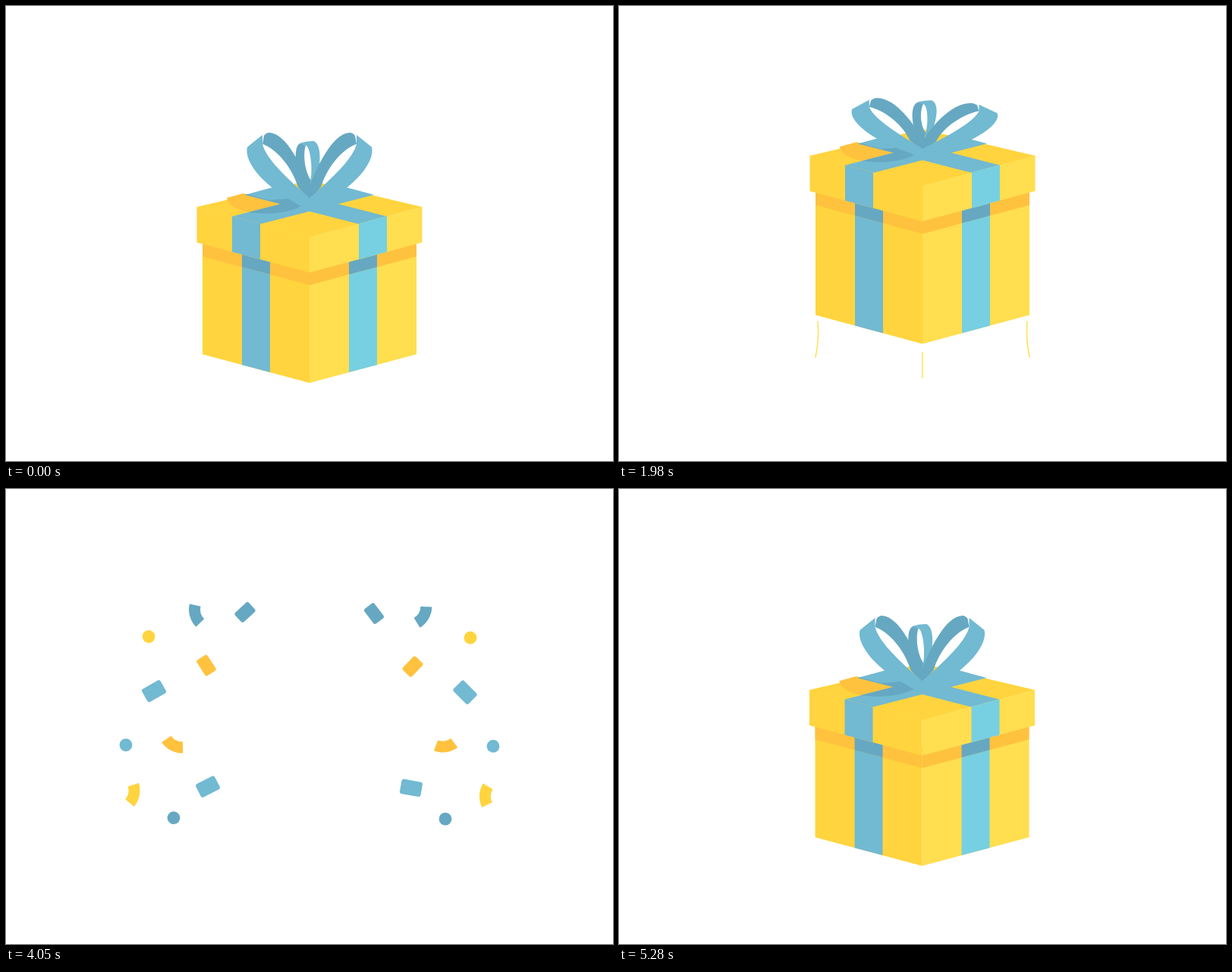
An HTML page with a canvas for the animation above (5310 ms loop, 800 by 600 pixels).

```html
<!DOCTYPE html>
<html lang="en">
<head>
<meta charset="utf-8">
<title>Gift box</title>
<style>
html, body { margin: 0; width: 100%; height: 100%; overflow: hidden; background: #fff; }
canvas { display: block; }
</style>
</head>
<body>
<canvas id="stage" width="800" height="600"></canvas>
<script>
const ctx = document.getElementById('stage').getContext('2d');
const LOOP = 5310, HOP = 1590, FINALE = 2790, BURST = 3550, SLIDE = 4722;
const YELLOW = '#ffd43e', LIGHT = '#ffde50', ORANGE = '#ffc23e';
const BLUE = '#72b9d2', DARK = '#66a8c2', CYAN = '#76d0e2';
const clamp = v => Math.min(1, Math.max(0, v));
const mix = (a, b, k) => a + (b - a) * k;
const easeOut = k => 1 - (1 - clamp(k)) ** 3;
const arch = k => Math.sin(Math.PI * clamp(k));
const rand = n => { const v = Math.sin(n * 127.1 + 3) * 43758.5; return v - Math.floor(v); };

const hops = [
  { crouch: 60, lift: 307, span: 532, rise: 142, dip: 26 },
  { crouch: 60 + HOP, lift: 307 + HOP, span: 532, rise: 142, dip: 26 },
  { crouch: 2850, lift: 3330, span: 240, rise: 164, dip: 44 }
];

// Damped wobble of the lid after a landing
const settle = s => s > 0 ? 48 * Math.exp(-s / 150) * Math.sin(Math.PI * s / 200) : 0;

// The lid outruns the floor of the box; the bow drags behind the lid
function pose(t) {
  let floor = 0, air = 0, ground = 0, drag = 0;
  for (const { crouch, lift, span, rise, dip } of hops) {
    const u = clamp((t - lift) / span);
    air -= rise * arch(u);
    floor -= rise * .76 * arch((t - lift - 8) / (span * .9));
    drag += Math.cos(Math.PI * u) * clamp(u * 8) * clamp((1 - u) * 8);
    ground += dip * arch((t - crouch) / (lift - crouch)) + settle(t - lift - span);
  }
  return {
    floor,
    lid: air + ground,
    sx: 1 + .15 * Math.abs(drag) + Math.max(0, ground) / 250,
    sy: 1 - .26 * drag - ground / 130
  };
}

function poly(color, ...pts) {
  ctx.fillStyle = color;
  ctx.beginPath();
  for (let i = 0; i < pts.length; i += 2) ctx.lineTo(pts[i], pts[i + 1]);
  ctx.fill();
}

function shape(color, d) {
  ctx.fillStyle = color;
  ctx.fill(new Path2D(d));
}

function stroke(color, width, d) {
  ctx.strokeStyle = color;
  ctx.lineWidth = width;
  ctx.lineCap = 'round';
  ctx.stroke(new Path2D(d));
}

// Runs draw inside its own transform
function group(x, y, draw) {
  ctx.save();
  ctx.translate(x, y);
  draw();
  ctx.restore();
}

// Upright band between two x values; its ends run parallel to the box rim
function band(color, x1, x2, top, bottom) {
  const y = (x, base) => base - Math.abs(x - 400) * .268;
  poly(color, x1, y(x1, top), x2, y(x2, top), x2, y(x2, bottom), x1, y(x1, bottom));
}

// Both front faces of a box, each with a strap
function faces(half, strap, top, bottom, left, right, strapL, strapR) {
  band(left, 400 - half, 400, top, bottom);
  band(right, 400, 400 + half, top, bottom);
  band(strapL, 400 - strap - 37, 400 - strap, top, bottom);
  band(strapR, 400 + strap, 400 + strap + 37, top, bottom);
}

const shade = new Path2D('M291 253C293 276 360 280 389 264L372 254L345 256L313 247Z');
const straps = new Path2D('M298 277.5L448 239L485 249L335 287.5ZM502 277.5L465 287.5L315 249L352 239Z');

function lidTop() {
  poly(YELLOW, 251.5, 265, 400, 230, 548.5, 265, 400, 305);
  ctx.fillStyle = ORANGE;
  ctx.fill(shade);
  ctx.fillStyle = BLUE;
  ctx.fill(straps);
  ctx.save();
  ctx.clip(straps);
  ctx.fillStyle = DARK;
  ctx.fill(shade);
  ctx.restore();
  faces(148.5, 65, 304.5, 351.5, YELLOW, LIGHT, BLUE, CYAN);
}

function bow(sx, sy) {
  const lean = (sx - 1) / .14;
  group(400, 263, () => {
    ctx.transform(1, 0, -.08 * lean, sy + .07 * lean, 0, 0);
    ctx.translate(-400, -263);
    shape(DARK, 'M389 181C377 182 380 220 398 250L402 230C392 215 392 192 395 184Z');
    shape(BLUE, 'M387 181Q396 178 405 178C418 182 415 218 405 240L401 232C405 215 401 185 395 184Z');
  });
  for (const side of [-1, 1]) group(400, 263, () => {
    const flop = side > 0 ? Math.max(0, 1 - sy) * .3 : 0;
    ctx.scale(side * (sx + flop), sy - flop);
    ctx.translate(-400, -263);
    shape(DARK, 'M460 171Q457 167 453 167C430 168 410 212 398 242L400 256L415 239C422 215 442 189 462 182Z');
    shape(BLUE, 'M462 170L482 186C487 205 460 240 412 262L400 269L399 254L415 240C440 217 458 198 462 182Z');
  });
}

function box({ floor, lid, sx, sy }, x = 0) {
  group(x, 0, () => {
    faces(141, 52, 340 + lid, 497 + floor, YELLOW, LIGHT, BLUE, CYAN);
    faces(141, 52, 340 + lid, 368 + lid, ORANGE, ORANGE, DARK, DARK);
    group(0, lid, () => { lidTop(); bow(sx, sy); });
  });
}

function speedLines(age) {
  const k = age / 125;
  if (k <= 0 || k >= 1) return;
  for (const i of [-1, 0, 1])
    stroke(LIGHT, 4 * (1 - k), `M${400 + 138 * i} ${457 - 41 * Math.abs(i)}q${-2 * i} 24 ${3 * i} ${33 + 14 * Math.abs(i)}`);
}

// Rays shoot outwards, then their inner ends catch up
function rays(age) {
  for (const i of [-1, 0, 1]) {
    const head = clamp((age - 8 - i * 8) / 40), tail = clamp((age - 98 - i * 25) / 110);
    if (head <= 0 || tail >= 1) continue;
    const bend = Math.abs(i);
    const at = k => `${400 + (31 + 12 * k) * i} ${38 + 7 * bend - (24 - 4 * bend) * k}`;
    stroke(ORANGE, 12, `M${at(tail)}L${at(head)}`);
  }
}

// Dust blobs sit on a half ellipse around the foot of the box, left ones first
function puff(age) {
  for (const side of [-1, 1]) for (let i = 0; i < 5; i++) {
    const a = side < 0 ? age : age - 62, life = side < 0 ? 365 : 328;
    if (a <= 0 || a >= life) continue;
    const k = clamp((a - 60) / (life - 60)), out = easeOut(k);
    const size = clamp(a / 60) * (1 - k * k), fat = 1 + arch(k) * .8;
    const angle = .245 + .28 * i, w = 30 - 2.5 * i, h = 9 - i;
    const x = side * 165 * Math.cos(angle) * (1 + .19 * out);
    group(400 + x, 463 + 56 * Math.sin(angle) + 18 * out, () => {
      ctx.scale(-side * size, size);
      ctx.rotate(.14 - .07 * i);
      const lens = `M${-w} ${-h * .6}Q${-w * .5} ${-h * 1.5 * fat} ${w * .1} ${-h * .4 * fat}` +
        `Q${w * .5} ${-h * .2} ${w} ${-h * .5}Q${w * .6} ${h * fat} 0 ${h * fat}Q${-w} ${h * .8} ${-w} ${-h * .6}Z`;
      group(3, 3, () => shape(ORANGE, lens));
      shape(LIGHT, lens);
    });
  }
}

const outline = {
  dot() { ctx.arc(0, 0, 8.4, 0, 7); },
  chip() { ctx.roundRect(-12.3, -8.4, 24.6, 16.8, 3); },
  card() { ctx.roundRect(-14, -9.8, 28, 19.6, 3); },
  arc() {
    ctx.arc(-25, 0, 33, -.5, .5);
    ctx.arc(-25, 0, 18, .5, -.5, true);
  }
};

// Kind, colour, resting place and turn in degrees; the right half mirrors it
const confetti = [
  ['chip', DARK, 308, 169, -42], ['arc', DARK, 243, 172, 153],
  ['dot', YELLOW, 181, 201, 0], ['chip', ORANGE, 257, 239, 48],
  ['card', BLUE, 188, 273, -42], ['dot', BLUE, 151, 344, 0],
  ['arc', ORANGE, 214, 344, 108], ['arc', YELLOW, 161, 409, 2],
  ['card', BLUE, 259, 399, -17], ['dot', DARK, 214, 440, 0]
];

// Pieces pop up in two small heaps, fly apart, then hover until they shrink
function burst(t) {
  if (t < BURST || t > 4890) return;
  const pop = clamp((t - BURST) / 50), fly = easeOut((t - 3600) / 270);
  const turn = easeOut((t - 3600) / 990);
  const drift = (t - 4590) * .013;
  const sag = 1.2 - 14 * Math.exp(-Math.max(0, t - 3870) / 300);
  const size = pop * (1 - clamp((t - 4660) / 230) ** 2);
  for (const side of [-1, 1]) confetti.forEach(([kind, color, x, y, deg], i) => {
    const seed = i * 3 + (side > 0 ? 40 : 0);
    const heapX = 411 + side * 29 + (rand(seed) - .5) * 44 * pop;
    const heapY = 305 + side * 12 + (rand(seed + 1) - .5) * 52 * pop;
    const endX = 400 + side * (400 - x + drift), endY = y + sag + side * .8 + .8;
    const rot = side < 0 ? deg : kind === 'arc' ? 180 - deg : -deg;
    group(mix(heapX, endX, fly), mix(heapY, endY, fly), () => {
      ctx.rotate((rot + (rand(seed + 2) - .5) * 160 * (1 - turn)) * Math.PI / 180);
      ctx.scale(size, size);
      ctx.fillStyle = color;
      ctx.beginPath();
      outline[kind]();
      ctx.closePath();
      ctx.fill();
    });
  });
}

function render(t) {
  ctx.fillStyle = '#fff';
  ctx.fillRect(0, 0, 800, 600);
  if (t < FINALE) speedLines(t % HOP - 310);
  for (const { lift, span } of hops) puff(t - lift - span + 30);
  if (t < BURST) box(pose(t));
  if (t < FINALE) rays(t % HOP - 589);
  burst(t);
  if (t > SLIDE) box(pose(0), -550 * (1 - easeOut((t - SLIDE) / 618)));
}

function tick() {
  render(performance.now() % LOOP);
  requestAnimationFrame(tick);
}
tick();
</script>
</body>
</html>
```
